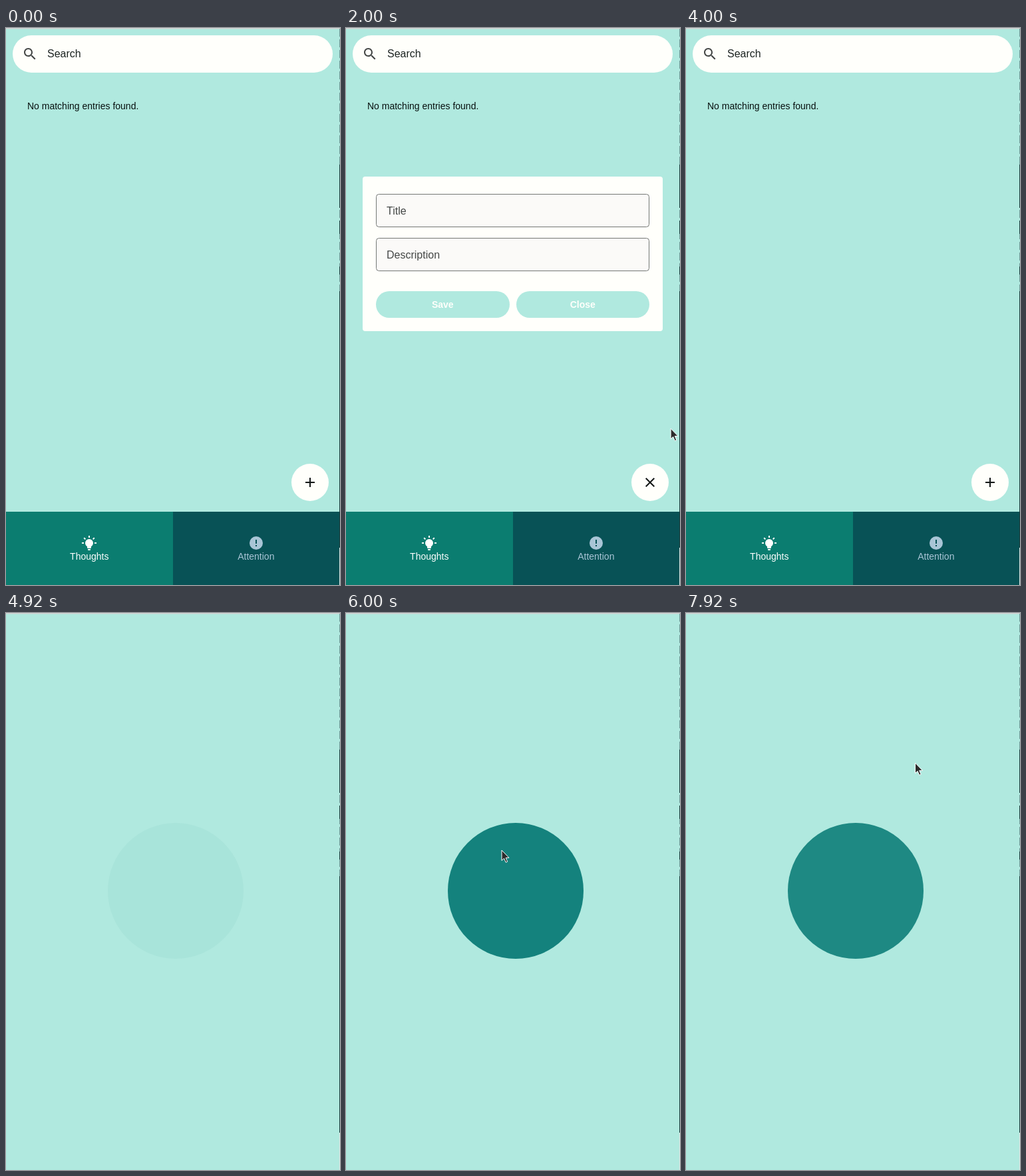
Animation, 502 px wide and 836 px high, one loop 8000 ms. Source, as an HTML page:

```html
<!DOCTYPE html>
<html lang="en">
<head>
<meta charset="utf-8">
<title>Thoughts</title>
<style>
  html, body { margin: 0; width: 100%; height: 100%; overflow: hidden; background: #b0e9df; }
  svg { display: block; width: 502px; height: 836px; }
  text { font: 14px "Liberation Sans", Arial, sans-serif; }
  .mid { text-anchor: middle; }
  .field { font-size: 16px; }
  .button { font-weight: bold; fill: #fffffb; }
</style>
</head>
<body>
<svg viewBox="0 0 502 836" xmlns="http://www.w3.org/2000/svg">
  <rect width="502" height="836" fill="#b0e9df"/>

  <g id="thoughts">
    <rect x="10" y="11" width="481" height="56" rx="28" fill="#fffffb"/>
    <path transform="translate(24 27)" fill="#444746" d="M15.5 14h-.79l-.28-.27C15.41 12.59 16 11.11 16 9.5 16 5.91 13.09 3 9.5 3S3 5.91 3 9.5 5.91 16 9.5 16c1.61 0 3.09-.59 4.23-1.57l.27.28v.79l5 4.99L20.49 19l-4.99-5zm-6 0C7.01 14 5 11.99 5 9.5S7.01 5 9.5 5 14 7.01 14 9.5 11.99 14 9.5 14z"/>
    <text class="field" x="62" y="44" fill="#1c2322">Search</text>
    <text x="32" y="122" fill="#07100f">No matching entries found.</text>

    <g id="dialog">
      <rect x="25" y="223" width="451" height="232" rx="4" fill="#fffffb"/>
      <g fill="#fbfaf8" stroke="#747775">
        <rect x="45.5" y="249.5" width="410" height="49" rx="4"/>
        <rect x="45.5" y="315.5" width="410" height="49" rx="4"/>
      </g>
      <text class="field" x="61" y="280" fill="#444746">Title</text>
      <text class="field" x="61" y="346" fill="#444746">Description</text>
      <rect x="45" y="395" width="201" height="40" rx="20" fill="#b0e9df"/>
      <rect x="256" y="395" width="200" height="40" rx="20" fill="#b0e9df"/>
      <text class="button mid" x="145.3" y="420">Save</text>
      <text class="button mid" x="355.8" y="420">Close</text>
    </g>

    <circle cx="457" cy="682" r="28" fill="#fffffb"/>
    <path id="plus" stroke="#131716" stroke-width="2" d="M450 682h14M457 675v14"/>
    <path id="cross" stroke="#131716" stroke-width="2" d="M450.7 675.7l12.6 12.6M463.3 675.7l-12.6 12.6"/>
  </g>

  <text id="heading" class="mid" x="250.5" y="372" fill="#22332f" style="font-size:24px;font-weight:bold">Attention</text>

  <g id="nav">
    <rect id="tabA" y="726" width="251" height="110"/>
    <rect id="tabB" x="251" y="726" width="251" height="110"/>
    <g id="itemA">
      <path id="bulbOn" transform="translate(113 761)" d="M12 6A6 6 0 0 1 18 12C18 14.22 16.79 16.16 15 17.2V19A1 1 0 0 1 14 20H10A1 1 0 0 1 9 19V17.2C7.21 16.16 6 14.22 6 12A6 6 0 0 1 12 6M14 21V22A1 1 0 0 1 13 23H11A1 1 0 0 1 10 22V21H14M20 11H23V13H20V11M1 11H4V13H1V11M13 1V4H11V1H13M4.92 3.5L7.05 5.64 5.63 7.05 3.5 4.93 4.92 3.5M16.95 5.63L19.07 3.5 20.5 4.93 18.37 7.05 16.95 5.63Z"/>
      <path id="bulbOff" transform="translate(113 761)" d="M12 2C9.76 2 7.78 3.05 6.5 4.68L16.31 14.5C17.94 13.21 19 11.24 19 9A7 7 0 0 0 12 2M3.28 4L2 5.27 5.04 8.3C5 8.53 5 8.76 5 9C5 11.38 6.19 13.47 8 14.74V17A1 1 0 0 0 9 18H14.73L18.73 22 20 20.72 3.28 4M9 20V21A1 1 0 0 0 10 22H14A1 1 0 0 0 15 21V20H9Z"/>
      <text class="mid" x="125.3" y="798">Thoughts</text>
    </g>
    <g id="itemB">
      <circle id="disc" cx="376" cy="773" r="10"/>
      <circle id="ring" cx="376" cy="773" r="9" fill="none" stroke="#fff" stroke-width="2"/>
      <path id="mark" stroke-width="2" d="M376 768v6M376 776v2"/>
      <text class="mid" x="375.8" y="798">Attention</text>
    </g>
  </g>

  <circle id="logo" cx="255" cy="417" r="102" fill="#0f7f7a"/>

  <rect width="502" height="1.5" fill="#d3d3d3"/>
  <g fill="none">
    <path stroke="#6f9b98" stroke-dasharray="12 4" d="M501.5 1V395"/>
    <path stroke="#183b3b" d="M501.5 205v65M501.5 289v20M501.5 358v12M501.5 395V780"/>
    <path stroke="#dfe9e7" d="M501.5 780V836"/>
  </g>

  <g id="cursor" stroke="#fff" stroke-width="1" stroke-linejoin="round" fill="#2b2b2b">
    <path id="arrow" d="M0 0V15.5L3.6 12.3 6.2 18.3 8.7 17.2 6.2 11.4H11Z"/>
    <path id="hand" d="M-1 0Q1 -1.5 2.5 .5V5Q4 4 5 5.5 6.5 4.5 7.7 6 9.3 5.2 10.5 7 12 7 12 9V12.5L10.5 17H2L-3.5 10.5Q-3 8 -1 9.5Z"/>
  </g>
</svg>
<script>
const LOOP = 8000;
const $ = id => document.getElementById(id);
const show = (id, on) => $(id).setAttribute('visibility', on ? 'inherit' : 'hidden');
const set = (id, name, value) => $(id).setAttribute(name, value);
const clamp = v => Math.min(1, Math.max(0, v));

// Time, x, y of the pointer; straight moves in between.
const path = [
  [160, 510, 815], [420, 485, 745], [740, 455, 680], [1820, 455, 680],
  [2000, 488.5, 602], [2170, 420, 470], [2330, 335, 390], [2500, 349, 412],
  [2660, 349, 412], [2920, 384, 776], [3240, 384, 776],
  [3420, 125, 777], [3580, 118, 777], [3750, 117, 222], [3920, 88, -10],
  [3990, 88, -30], [4980, 98, -25], [5160, 185, 190], [5330, 264, 432],
  [5500, 264, 432], [6000, 234, 356], [7070, 234, 356], [7420, 344.5, 225], [LOOP, 344.5, 225]
];

// The CSS "ease" curve, solved by bisection.
function ease(x) {
  const bezier = (s, a, b) => 3 * s * (1 - s) ** 2 * a + 3 * s * s * (1 - s) * b + s ** 3;
  let low = 0, high = 1;
  for (let i = 0; i < 20; i++) {
    const s = (low + high) / 2;
    if (bezier(s, .25, .25) < x) low = s; else high = s;
  }
  return bezier(low, .1, 1);
}

function pointer(t) {
  if (t < path[0][0]) return [-50, -50];
  const i = path.findIndex(p => p[0] > t);
  const [t0, x0, y0] = path[i - 1], [t1, x1, y1] = path[i];
  const k = (t - t0) / (t1 - t0);
  return [x0 + (x1 - x0) * k, y0 + (y1 - y0) * k];
}

function draw(t) {
  const splash = t >= 4570;
  const attention = t >= 3070 && t < 3490;
  const open = t >= 1070 && t < 2660;

  show('thoughts', !splash && !attention);
  show('heading', attention);
  show('nav', !splash);
  show('plus', !open);
  show('cross', open);
  set('dialog', 'opacity', clamp((t - 1070) / 300) * (1 - clamp((t - 2660) / 150)));

  const on = '#0b7d70', off = '#085256', dim = '#a9c5d6';
  set('tabA', 'fill', attention ? off : on);
  set('tabB', 'fill', attention ? on : off);
  set('itemA', 'fill', attention ? dim : '#fff');
  set('itemB', 'fill', attention ? '#fff' : dim);
  set('mark', 'stroke', attention ? '#fff' : off);
  show('bulbOn', !attention);
  show('bulbOff', attention);
  show('disc', !attention);
  show('ring', attention);

  set('logo', 'opacity', ease(clamp((t - 4830) / 1500)) * (1 - ease(clamp((t - 7770) / 1500))));

  const [x, y] = pointer(t);
  const overFab = Math.hypot(x - 457, y - 682) < 28;
  const overButton = open && x > 45 && x < 456 && y > 395 && y < 435;
  const hand = !splash && (overFab || overButton || y > 726);
  set('cursor', 'transform', `translate(${x} ${y})`);
  show('arrow', !hand);
  show('hand', hand);
}

const start = performance.now();
function tick() {
  draw((performance.now() - start) % LOOP);
  requestAnimationFrame(tick);
}
tick();
</script>
</body>
</html>
```
